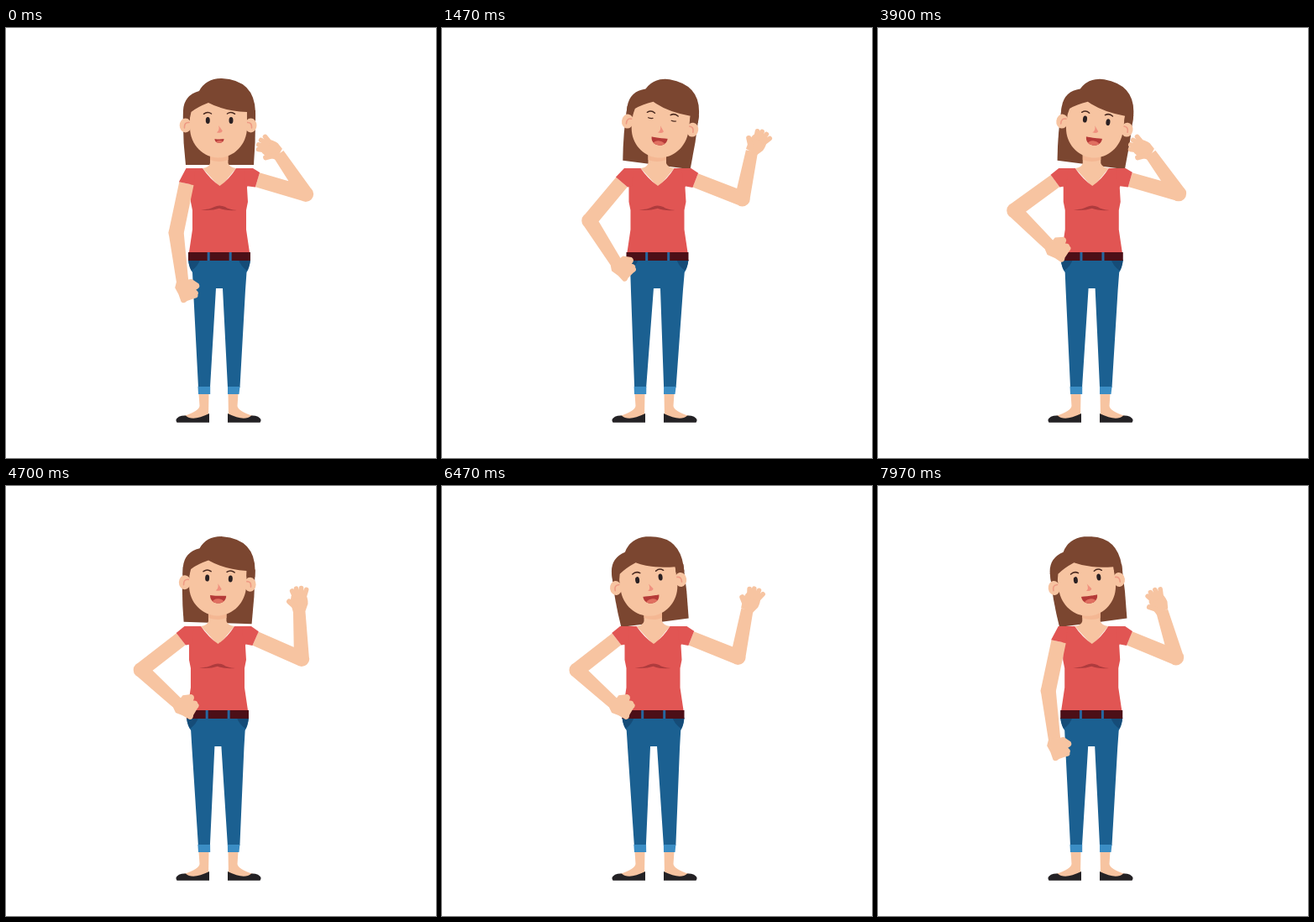
An HTML page for the animation above (8000 ms loop, 512 by 512 pixels).

```html
<!DOCTYPE html>
<html lang="en">
<head>
<meta charset="utf-8">
<title>Waving woman</title>
<style>
  html, body { margin: 0; width: 100%; height: 100%; overflow: hidden; background: #fff; }
  svg { display: block; width: 100vw; height: 100vh; }
  .skin { fill: #f7c4a1; }
  .hair { fill: #7b4630; }
  .shirt { fill: #e15553; }
  .jeans { fill: #1b6091; }
  .pocket { fill: #154c78; }
  .cuff { fill: #3b8dc4; }
  .belt { fill: #4c0f17; }
  .shoe { fill: #242225; }
  .line { fill: none; stroke-linecap: round; }
  .finger { fill: none; stroke: #f7c4a1; stroke-linecap: round; }
</style>
</head>
<body>
<svg viewBox="0 0 512 512">
  <defs>
    <g id="foot">
      <path class="skin" d="M229.5 435H241.5L241 464L220 466L212 462Q230 456 230.5 450Z"/>
      <path class="shoe" d="M242 459V469.7H203.5Q200.5 466 206 462.8Q210 461 214 461.5Q222 469 242 459Z"/>
    </g>
    <clipPath id="lips"><path id="lipsShape"/></clipPath>
  </defs>

  <g class="head">
    <path class="hair" d="M211 98Q210 130 214 163H295Q297.500 130 297 98Z"/>
  </g>

  <use href="#foot"/>
  <use href="#foot" transform="translate(506 0) scale(-1 1)"/>
  <g id="legs">
    <path class="jeans" d="M217 276H291Q290 286 286.500 291L285 312L278.500 428H264L258 310H250L243 428H229L223 312L222 291Q218 286 217 276Z"/>
    <path class="pocket" d="M217 276H231Q229 283 221 289Q218 284 217 276ZM291 276H277Q279 283 287 289Q290 284 291 276Z"/>
    <path class="cuff" d="M228.500 427H243.200V436H229ZM264 427H278.500L277.500 436H264Z"/>
  </g>

  <g id="torso">
    <path class="skin" d="M243 146H264.500V161Q266 166 274 167L255 190L234 167Q242 166 243 161Z"/>
    <path fill="#f4b793" d="M243 146H264.500V157Q254 161 243 157Z"/>
    <path class="shirt" d="M215 167H234Q243 180 254.500 188Q266 180 274 167H293L287 190L288 207L286 217V240L290 267H218L222 240V217L220 207V190Z"/>
    <path fill="#ae3b3d" d="M232 216.500Q243 216 248 213Q254 210 261 213Q265 216 275 217Q262 218 254 214.800Q244 218 232 216.500Z"/>
    <path class="belt" d="M217 267H291V277H217Z"/>
    <path fill="#2667a0" d="M239.700 267h3v10h-3zM265.700 267h3v10h-3z"/>
  </g>

  <path id="armL" class="skin"/>
  <path id="armR" class="skin"/>
  <path id="sleeveL" class="shirt"/>
  <path id="sleeveR" class="shirt"/>
  <path id="fist" class="skin" d="M-6.500 -1L-9 8Q-4 16 -2 25Q1 28 5 24L13 21.500Q19 21 18 17Q20 14 16 11Q22 9 19.500 4L11 -2L6 -1Z"/>
  <g id="palm">
    <path class="skin" d="M-7.500 1L-9 -8Q-10 -20 -4 -21.500H8.500Q12 -14 11 -7L7.500 1Z"/>
    <path class="finger" stroke-width="5.600" d="M-4 -17L-6.400 -23.800M0 -17L-1.300 -26.200M4 -17L4.800 -26.200M8 -17L10.700 -23.800"/>
    <path class="finger" stroke-width="6.200" d="M-4 -4L-11 -11.500"/>
  </g>

  <g class="head">
    <ellipse class="skin" cx="213.700" cy="116" rx="7" ry="8.500"/>
    <ellipse class="skin" cx="291.500" cy="116" rx="7" ry="8.500"/>
    <path class="line" stroke="#ee9a84" stroke-width="1.600" d="M218 112.500Q212 112 212.500 119M287 112.500Q293 112 292.500 119"/>
    <path class="skin" d="M219 100L238 82H262L287 95V118C287 140 270 154.500 253 154.500S219 140 219 118Z"/>
    <path class="hair" d="M211 107V98Q212 80 230 75Q238 60 257 60Q296 62 297 100V107H287V100Q260 99 241 89Q228 94 220.500 100L219 107Z"/>
    <path class="line" stroke="#4b2a20" stroke-width="1.500" d="M235.500 102.300Q240 98.800 244.500 102M263.500 102Q268 98.800 272.500 102.300"/>
    <g id="eyesOpen" fill="#2a2022">
      <ellipse cx="240.300" cy="110" rx="2.500" ry="4"/>
      <ellipse cx="268" cy="110" rx="2.500" ry="4"/>
    </g>
    <path id="eyesShut" class="line" stroke="#4b2a20" stroke-width="1.200" d="M237.500 108.500Q240.300 109.300 243 108.500M265.300 108.500Q268 109.300 270.800 108.500"/>
    <path fill="#f0917f" d="M253 116L257.800 122.500Q257 125.500 251 124.500Q255 122 253 116Z"/>
    <g clip-path="url(#lips)">
      <path fill="#b53a38" d="M240 126h30v18h-30z"/>
      <ellipse id="tongue" fill="#e06f60" cx="254.300"/>
    </g>
  </g>
</svg>
<script>
const LOOP = 8000;
const UPPER = 67.7, FORE = 57.7;
const $ = id => document.getElementById(id);
const heads = document.querySelectorAll('.head');

// Turning points of the wave: hand in, hand out, hand in ...
const turns = [0, 500, 1010, 1520, 1980, 2437, 2930, 3420, 3900,
               4450, 4980, 5520, 6050, 6610, 7120, 7640, 8165];

const ease = p => (1 - Math.cos(Math.PI * Math.min(1, Math.max(0, p)))) / 2;
const ramp = (t, from, to) => ease((t - from) / (to - from));
const mix = (a, b, p) => a + (b - a) * p;
const poly = pts => 'M' + pts.map(p => p.map(n => n.toFixed(2)).join(' ')).join('L') + 'Z';

function waveAt(t) {
  const i = turns.findIndex(x => x > t) - 1;
  const p = ramp(t, turns[i], turns[i + 1]);
  return i % 2 ? 1 - p : p;
}

// Elbow position of a two-bone limb.
function elbowOf([sx, sy], [wx, wy]) {
  const dx = wx - sx, dy = wy - sy, d = Math.hypot(dx, dy);
  const a = (UPPER ** 2 - FORE ** 2 + d * d) / (2 * d);
  const h = Math.sqrt(Math.max(0, UPPER ** 2 - a * a));
  return [sx + (dx * a - dy * h) / d, sy + (dy * a + dx * h) / d];
}

// The two points r to either side of p, across the direction from a to b.
function sides(p, a, b, r) {
  const d = Math.hypot(b[0] - a[0], b[1] - a[1]);
  const nx = -(b[1] - a[1]) / d * r, ny = (b[0] - a[0]) / d * r;
  return [[p[0] + nx, p[1] + ny], [p[0] - nx, p[1] - ny]];
}

function taper(a, b, ra, rb) {
  const [a1, a2] = sides(a, a, b, ra), [b1, b2] = sides(b, a, b, rb);
  return poly([a1, a2, b2, b1]);
}

// Clockwise like taper(), so that overlaps stay filled.
const disc = ([x, y], r) =>
  `M${x - r} ${y}a${r} ${r} 0 1 1 ${2 * r} 0a${r} ${r} 0 1 1 ${-2 * r} 0Z`;

// side is -1 for the arm on the left of the stage and 1 for the right.
function drawArm(name, shoulder, wrist, side) {
  const elbow = elbowOf(shoulder, wrist);
  const cut = shoulder.map((v, i) => mix(v, elbow[i], 7.8 / UPPER));
  $('arm' + name).setAttribute('d',
    taper(cut, elbow, 8.8, 9) + taper(elbow, wrist, 9, 7.2) + disc(elbow, 9.3));
  const [low, high] = sides(cut, shoulder, elbow, 9.2 * side);
  $('sleeve' + name).setAttribute('d', poly([
    [shoulder[0] + 2 * side, 167], high, low,
    [shoulder[0] - 7 * side, 188], [shoulder[0] - 9 * side, 167]]));
  return Math.atan2(wrist[1] - elbow[1], wrist[0] - elbow[0]) * 180 / Math.PI;
}

const place = (el, [x, y], angle) =>
  el.setAttribute('transform', `translate(${x} ${y}) rotate(${angle})`);

function drawMouth(open) {
  const w = mix(5.5, 9.6, open), top = mix(132, 130.3, open), h = mix(5, 9.5, open);
  $('lipsShape').setAttribute('d',
    `M${254 - w} ${top}Q254 ${top + 1} ${254 + w} ${top}` +
    `C${254 + w} ${top + h * 1.3} ${254 - w} ${top + h * 1.3} ${254 - w} ${top}Z`);
  const tongue = $('tongue');
  tongue.setAttribute('cy', top + h);
  tongue.setAttribute('rx', w * 0.8);
  tongue.setAttribute('ry', h * 0.58);
}

function draw(t) {
  const sway = -2.5 * Math.sin(t * Math.PI / 1000);
  const smile = ramp(t, 600, 1100);
  const tilt = 7.4 * (smile - 2 * ramp(t, 4450, 5050));
  const onHip = ramp(t, 1190, 1730) - ramp(t, 7160, 7700);
  const wave = waveAt(t);

  for (const head of heads)
    head.setAttribute('transform', `translate(${sway} 0) rotate(${tilt} 254 151)`);
  $('torso').setAttribute('transform', `translate(${sway} 0)`);
  const lean = sway / 159;
  $('legs').setAttribute('transform', `matrix(1 0 ${-lean} 1 ${lean * 436} 0)`);

  const wristL = [mix(210, 203.5, onHip), mix(301, 258, onHip)];
  const foreL = drawArm('L', [216.5 + sway, 177.5], wristL, -1);
  place($('fist'), wristL, foreL - 84);

  const wristR = [mix(324.5, 370, wave), mix(150, 146.5, wave)];
  drawArm('R', [292 + sway, 178.5], wristR, 1);
  place($('palm'), wristR, mix(-62, 32, wave) + 24 * wave * (1 - wave));

  const shut = t >= 1400 && t < 1560;
  $('eyesOpen').style.display = shut ? 'none' : '';
  $('eyesShut').style.display = shut ? '' : 'none';
  drawMouth(smile);
}

const start = performance.now();
function tick() {
  draw((performance.now() - start) % LOOP);
  requestAnimationFrame(tick);
}
tick();
</script>
</body>
</html>
```
